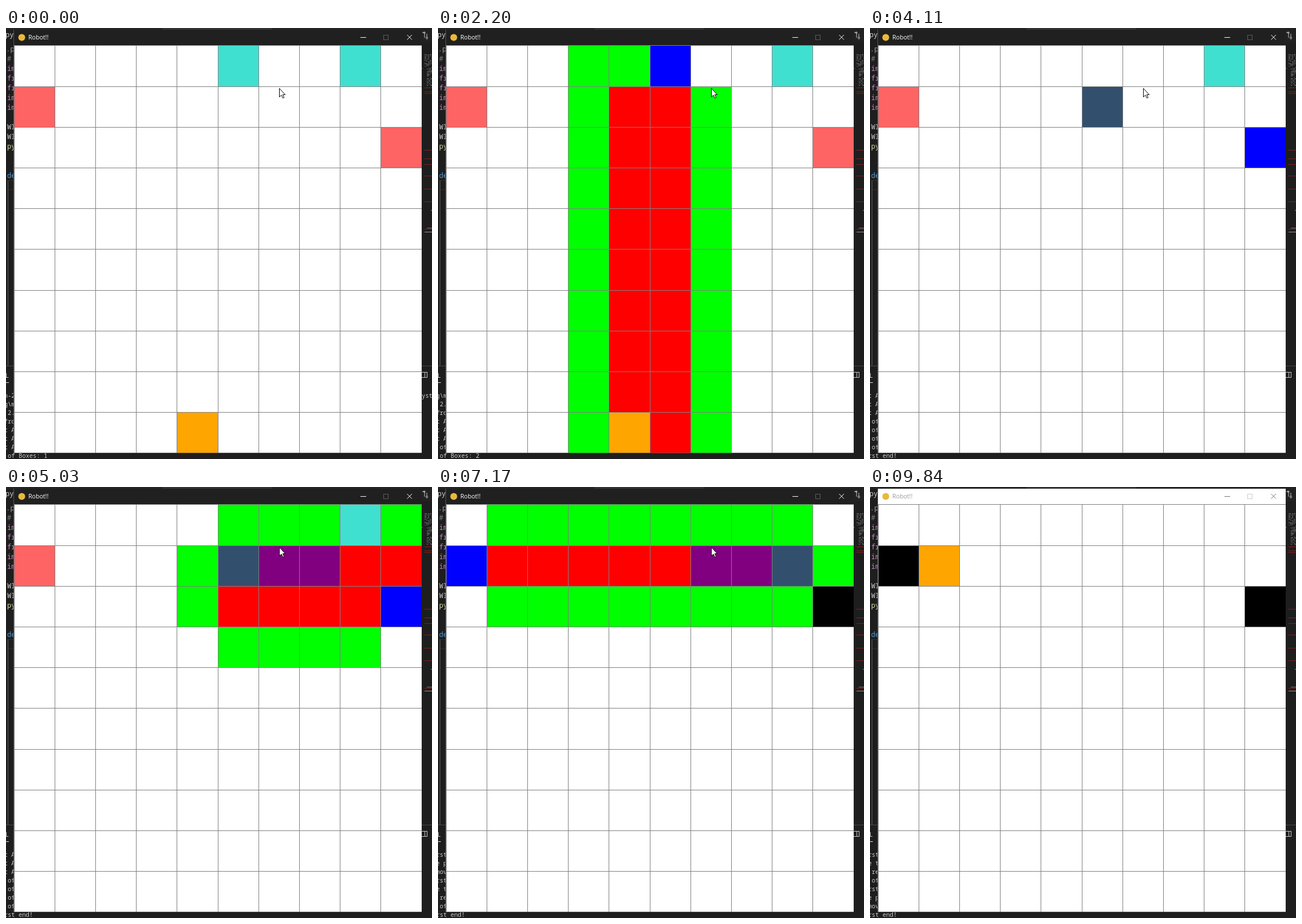
An HTML page that plays this animation: 744x753 px, repeating every 9880 ms.

```html
<!DOCTYPE html>
<html lang="en">
<head>
<meta charset="utf-8">
<title>Robot!!</title>
<style>
  html, body { margin: 0; width: 100%; height: 100%; overflow: hidden; background: #1e1e1e; }
  svg { display: block; width: 744px; height: 753px; }
  rect, .thin { shape-rendering: crispEdges; }
  text { white-space: pre; }
  .code { font: 12px "Noto Sans Mono", "Liberation Mono", monospace; }
  .term { font: 10.5px "Noto Sans Mono", "Liberation Mono", monospace; fill: #ccc; }
  .title { font: 10.6px "Open Sans", "Noto Sans", sans-serif; }
  .bar { fill: #202020; }
  .title, .bar + .title { fill: #fff; }
  .btn { fill: none; stroke: #fff; }
  .max { stroke: #5c5c5c; }
  .idle .bar { fill: #fff; }
  .idle .title { fill: #999; }
  .idle .btn { stroke: #777; }
  .idle .max { stroke: #ccc; }
</style>
</head>
<body>
<svg viewBox="0 0 744 753">
  <rect width="744" height="753" fill="#1e1e1e"/>
  <rect width="744" height="3" fill="#252526"/>
  <rect x="273" width="192" height="3" fill="#333"/>
  <rect x="726" width="18" height="25" fill="#222223"/>

  <g id="editor">
    <rect x="3" y="266" width="1" height="324" fill="#606060"/>
    <rect x="4" y="266" width="10" height="1" fill="#303030"/>
    <rect x="4" y="282" width="10" height="1" fill="#303030"/>
    <rect y="590" width="744" height="1" fill="#484848"/>
    <text x="-7" y="611" font-family="Open Sans, sans-serif" font-size="10" fill="#e7e7e7">AL</text>
    <rect y="619" width="5" height="1" fill="#e7e7e7"/>
  </g>

  <g id="map"></g>
  <g fill="none" stroke="#c5c5c5">
    <path d="M727 8h4v9M733 8h-3M731 6l-2 2 2 2M735 10v7"/>
    <circle cx="735" cy="17.5" r="1.6"/>
    <path class="thin" d="M725.5 601.5h10v9h-10zM731.5 601v10"/>
  </g>
  <g id="term" class="term"></g>
  <text id="tail" class="term" x="726" y="646">yst</text>

  <g id="win">
    <rect x="13" y="3" width="713" height="740" fill="#555"/>
    <rect class="bar" x="14" y="3" width="712" height="27"/>
    <text class="title" x="39" y="20">Robot!!</text>
    <circle cx="27.5" cy="16.5" r="6" fill="#e8b93c"/>
    <path class="btn thin" d="M619 16.5h10"/>
    <path class="btn max thin" d="M659.5 12.5h8v8h-8z"/>
    <path class="btn" d="M700.5 12l8.5 8.5M709 12l-8.5 8.5"/>
  </g>
  <g id="board"></g>
  <path id="cursor" d="M0 0V15L3.4 11.8 6 17 8.2 16 5.8 11H10.2Z" fill="#fff" stroke="#000" stroke-width="1"/>
</svg>

<script>
const LOOP = 9880;
const WHITE = "#fff", ORANGE = "#ffa500", BOX = "#40e0d0", TARGET = "#ff6464", GOAL = "#00f",
  OPEN = "#0f0", CLOSED = "#f00", PATH = "#800080", LOADED = "#32506e", DONE = "#000";
const $ = id => document.getElementById(id);

function add(parent, tag, attrs, text) {
  const el = document.createElementNS("http://www.w3.org/2000/svg", tag);
  for (const k in attrs) el.setAttribute(k, attrs[k]);
  if (text) el.textContent = text;
  return parent.appendChild(el);
}

// Editor text peeking out on the left
const PINK = "#c586c0", PALE = "#dcdcaa", LIGHT = "#d4d4d4";
[["py", 12, LIGHT, -1], ["n.py", 37, "#a0a0a0", -7], ["#", 54, "#7f7f7f"], ["import", 71, PINK],
 ["from", 88, PINK], ["from", 105, PINK], ["import", 122, PINK], ["import", 139, PINK],
 ["WIN", 173, LIGHT], ["WIN", 190, LIGHT], ["py", 207, PALE], ["def", 258, "#569cd6"]]
  .forEach(([s, y, fill, x = 2]) => add($("editor"), "text", { class: "code", x, y: y + 4, fill }, s));

// Minimap on the right
let seed = 7;
const rnd = () => (seed = seed * 16807 % 2147483647) / 2147483647;
const bar = (x, y, width, fill) => add($("map"), "rect", { x, y, width, height: 1, fill });
for (let y = 46; y < 102; y += 2) {
  const x = y < 70 ? 731 : 735;
  for (let k = x; k < 744; k += 3) if (rnd() < .75) bar(k, y, 1 + rnd() * 2, y % 3 ? "#777" : "#595959");
}
[104, 111, 114, 213, 228, 238, 258, 281, 303, 351].forEach(y => bar(731, y, 13, "#8c1d1d"));
bar(735, 349, 9, "#777");
bar(731, 356, 13, "#999");
bar(742, 318, 2, "#888");
bar(726, 70, 2, "#3a6ea5");

// Board
const lineX = i => Math.round(13.6 + 71.2 * i), lineY = i => Math.round(30.3 + 71.2 * i);
const tiles = Array.from({ length: 100 }, (_, i) => {
  const c = i % 10, r = i / 10 | 0, x = lineX(c), y = lineY(r);
  return add($("board"), "rect", { x, y, width: lineX(c + 1) - x, height: lineY(r + 1) - y });
});
for (let i = 0; i < 10; i++) {
  add($("board"), "rect", { x: lineX(i), y: 30, width: 1, height: 712, fill: "#808080" });
  add($("board"), "rect", { x: 14, y: lineY(i), width: 712, height: 1, fill: "#808080" });
}
const rows = Array.from({ length: 8 }, (_, i) => add($("term"), "text", { x: -3.3, y: 646 + 15 * i }));

// Simulation: A* searches, each draw stored as a step
const cells = Array(100).fill(WHITE);
const log = ["n-2.6", "g\\ma", " 2.6", "from", "t A", "t A", "t A", " of Boxes: 1"];
const steps = [];
const snap = () => steps.push({ cells: [...cells], log: log.slice(-8) });
let robot = 94, skin = ORANGE;

function neighbours(i) {
  const c = i % 10, r = i / 10 | 0;
  return [[c + 1, r], [c - 1, r], [c, r + 1], [c, r - 1]]
    .filter(([x, y]) => x >= 0 && x < 10 && y >= 0 && y < 10)
    .map(([x, y]) => x + 10 * y)
    .filter(n => ![BOX, TARGET, DONE].includes(cells[n]));
}

function search(end) {
  const dist = (a, b) => Math.abs(a % 10 - b % 10) + Math.abs((a / 10 | 0) - (b / 10 | 0));
  const cost = { [robot]: 0 }, from = {};
  const queue = [{ id: robot, f: 0 }];
  for (;;) {
    let best = 0;
    queue.forEach((q, k) => { if (q.f < queue[best].f) best = k; });
    const cur = queue.splice(best, 1)[0].id;
    if (cur === end) break;
    for (const n of neighbours(cur)) {
      if (n in cost && cost[n] <= cost[cur] + 1) continue;
      cost[n] = cost[cur] + 1;
      from[n] = cur;
      queue.push({ id: n, f: cost[n] + dist(n, end) });
      if (n !== end) cells[n] = OPEN;
    }
    snap();
    if (cur !== robot) cells[cur] = CLOSED;
  }
  const path = [];
  for (let p = from[end]; p !== robot; p = from[p]) path.unshift(p);
  return path;
}

function leg(end, ...lines) {
  const path = search(end);
  for (const p of path) { cells[p] = PATH; snap(); }
  cells.forEach((c, i) => { if (c === OPEN || c === CLOSED) cells[i] = WHITE; });
  log.push(...lines);
  for (const p of path) {
    cells[robot] = WHITE;
    cells[robot = p] = skin;
    snap();
  }
}

function arrive(spot, left, nextSkin, goal, ...lines) {
  log.push(...lines, "rst end!");
  snap();
  cells[spot] = left;
  cells[robot] = skin = nextSkin;
  cells[goal] = GOAL;
  snap();
}

cells[5] = cells[8] = BOX;
cells[10] = cells[29] = TARGET;
cells[robot] = ORANGE;
snap();
log.push(" of Boxes: 2");
snap();
cells[5] = GOAL;
snap();
snap();
leg(5, " of Targets 1");
arrive(5, WHITE, LOADED, 29, " of Targets 2");
leg(29, "e path is set", "moved the box");
arrive(29, DONE, ORANGE, 8);
leg(8, "e target is met", " removed", " of Targets 1");
arrive(8, WHITE, LOADED, 10);
leg(10, "e path is set", "moved the box");
log.push("rst end!");
cells[10] = DONE;
cells[robot] = ORANGE;
snap();

// Evenly spaced runs of steps: first time, last time, count
const times = [0];
[[170, 1060, 11], [1190, 1370, 3], [1480, 2090, 7], [2200, 3170, 11], [3300, 3930, 8], [3970, 4190, 4],
 [4300, 4380, 2], [4520, 5030, 7], [5120, 5430, 5], [5530, 6020, 7], [6180, 6350, 4], [6440, 7060, 8],
 [7170, 8090, 11], [8180, 8360, 3]]
  .forEach(([a, b, n]) => { for (let k = 0; k < n; k++) times.push(Math.round(a + (b - a) * k / (n - 1))); });

let shown = -1;
function render(t) {
  let k = steps.length - 1;
  while (times[k] > t) k--;
  if (k !== shown) {
    shown = k;
    steps[k].cells.forEach((c, i) => tiles[i].setAttribute("fill", c));
    steps[k].log.forEach((s, i) => rows[i].textContent = s);
    $("tail").style.display = k ? "none" : "";
  }
  const u = Math.min(1, Math.max(0, (t - 8400) / 760)), e = u * u * (3 - 2 * u);
  $("cursor").setAttribute("transform", `translate(${477.5 + 189.5 * e} ${105.5 + 642.5 * e})`);
  $("cursor").style.display = t < 9260 ? "" : "none";
  $("win").setAttribute("class", t >= 9840 ? "idle" : "");
}

const began = performance.now();
function tick() {
  render((performance.now() - began) % LOOP);
  requestAnimationFrame(tick);
}
tick();
</script>
</body>
</html>
```
